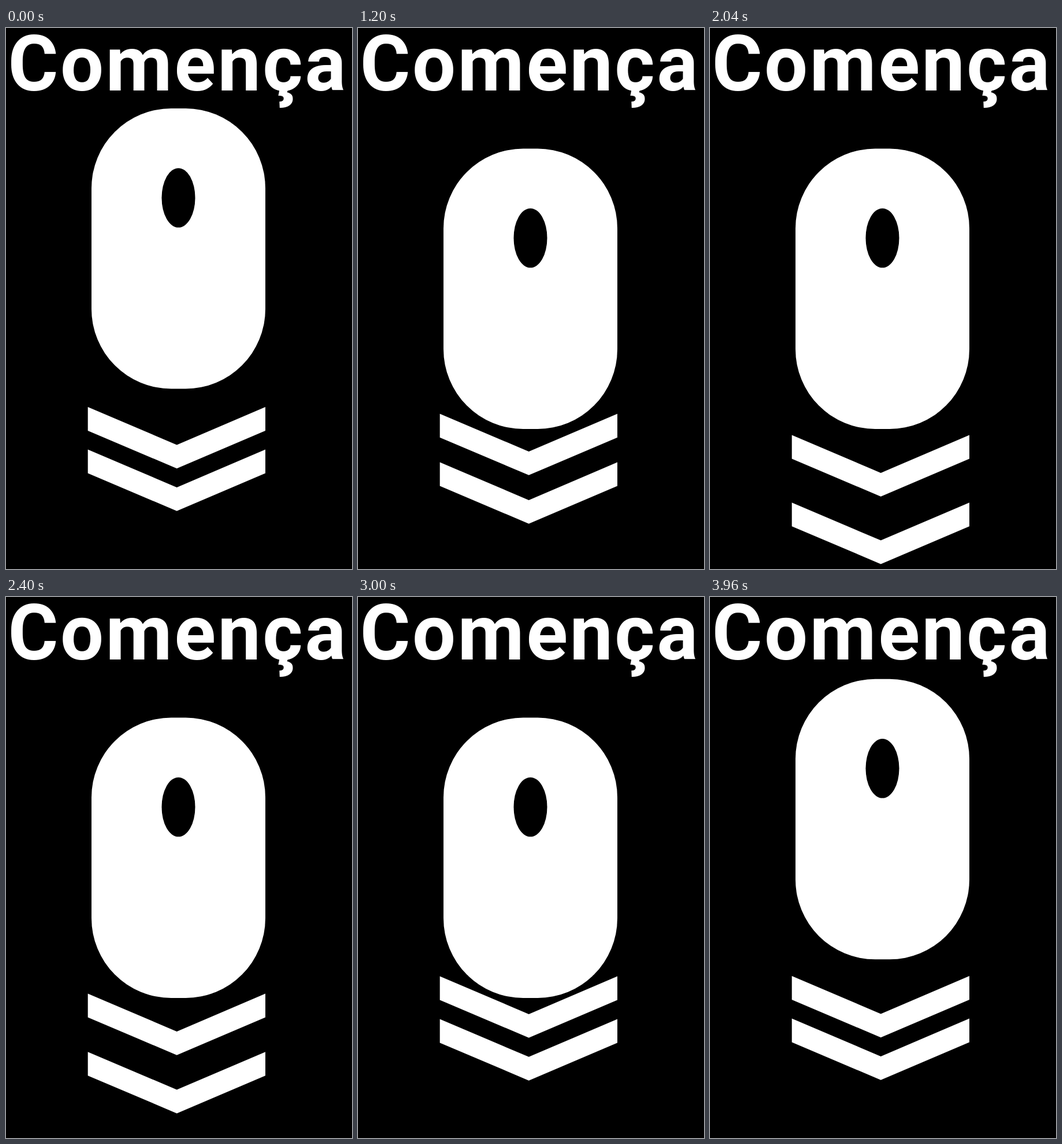
Write an HTML page that moves like this. It is 599 px wide and 935 px high and loops after 4 s.

```html
<!DOCTYPE html>
<html lang="ca">
<head>
<meta charset="utf-8">
<title>Comença</title>
<style>
  html, body { margin: 0; width: 100%; height: 100%; overflow: hidden; background: #000; }
  svg { display: block; width: 100%; height: 100%; fill: #fff; }
  text { font: 600 133px Roboto, sans-serif; letter-spacing: 3.4px; }
</style>
</head>
<body>
<svg viewBox="0 0 599 935">
  <defs>
    <path id="chevron" d="M141.7 655L295.7 720.4L449 655V696L295.7 761.2L141.7 696Z"/>
  </defs>
  <text x="3.5" y="107.5">Comença</text>
  <g id="mouse">
    <rect x="148" y="139" width="301" height="484.5" rx="138"/>
    <ellipse cx="298.5" cy="293.5" rx="29" ry="51.3" fill="#000"/>
  </g>
  <use id="upper" href="#chevron"/>
  <use id="lower" href="#chevron"/>
</svg>
<script>
  const LOOP = 4000, STEP = 40;
  const DROP = 69.5, GAP = 73.5, STRETCH = 50.5, SPREAD = 45;

  const ramp = (t, from, to) => Math.min(1, Math.max(0, (t - from) / (to - from)));
  const move = (id, y) => document.getElementById(id).setAttribute('transform', `translate(0 ${y})`);

  // The mouse drops and waits while the chevrons stretch away and spring back.
  function draw(t) {
    const drop = ramp(t, 0, 1000) - ramp(t, 3010, LOOP);
    const stretch = ramp(t, 960, 2000) - ramp(t, 2000, 3010);
    move('mouse', DROP * drop);
    move('upper', STRETCH * stretch);
    move('lower', GAP + (STRETCH + SPREAD) * stretch);
  }

  const start = performance.now();
  function tick() {
    const elapsed = (performance.now() - start) % LOOP;
    draw(Math.floor(elapsed / STEP) * STEP);
    requestAnimationFrame(tick);
  }
  tick();
</script>
</body>
</html>
```
